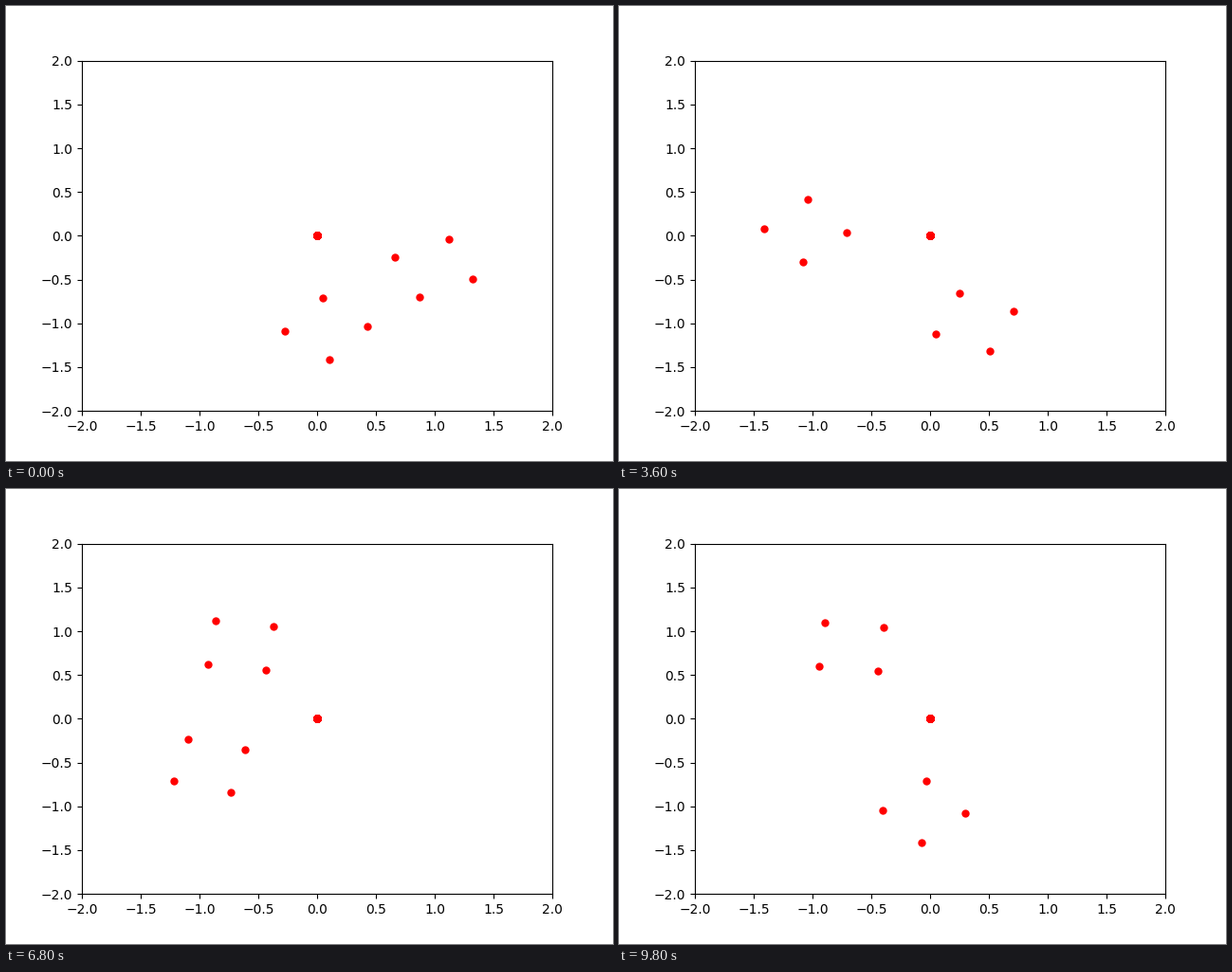
Write a matplotlib script that moves like this. It is 640 px wide and 480 px high and loops after 10 s.

```python
import numpy as np
import matplotlib.pyplot as plt
from matplotlib.animation import FuncAnimation

FRAMES = 50
INTERVAL = 200  # ms

SQUARE = np.array([[0.5, 1.0, 1.0, 0.5],
                   [0.5, 0.5, 1.0, 1.0]])
# Stacked markers at the origin give it a crisp, solid edge
ORIGIN = np.zeros((2, 60))


def rotate(points, angle):
    c, s = np.cos(angle), np.sin(angle)
    return np.array([[c, -s], [s, c]]) @ points


fig, ax = plt.subplots(figsize=(6.4, 4.8), dpi=100)
ax.set_xlim(-2, 2)
ax.set_ylim(-2, 2)
dots, = ax.plot([], [], "ro", markersize=5)


def update(frame):
    angle = frame + 2  # one radian per step
    slow = rotate(-SQUARE, angle)
    fast = rotate(SQUARE, 2 * angle)
    dots.set_data(*np.hstack([ORIGIN, slow, fast]))
    return dots,


anim = FuncAnimation(fig, update, frames=FRAMES, interval=INTERVAL,
                     repeat=True, repeat_delay=0)
plt.show()
```
